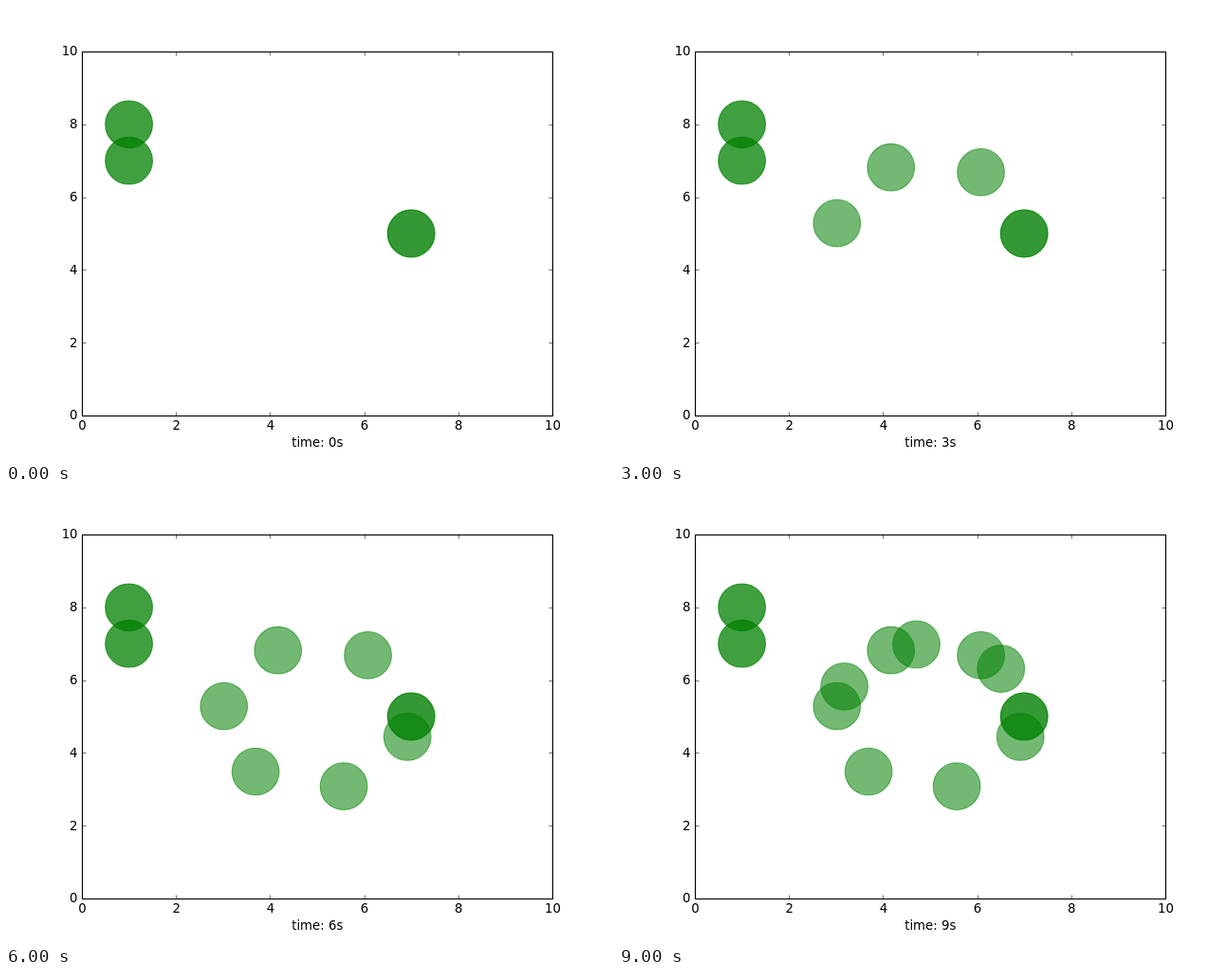
Recreate the animation shown at these times as an HTML page with a canvas. Size 640 by 480 pixels, loop 10 s.

```html
<!DOCTYPE html>
<html lang="en">
<head>
<meta charset="utf-8">
<title>Points on a circle</title>
<style>
  html, body { margin: 0; width: 100%; height: 100%; overflow: hidden; background: #fff; }
  canvas { display: block; }
</style>
</head>
<body>
<canvas id="stage" width="640" height="480"></canvas>
<script>
const ctx = document.getElementById('stage').getContext('2d');
const LEFT = 80, RIGHT = 576, TOP = 48, BOTTOM = 432;
const LINE = 10 / 9; // one point at 80 dpi
const toX = v => LEFT + v * (RIGHT - LEFT) / 10;
const toY = v => BOTTOM - v * (BOTTOM - TOP) / 10;
const snap = v => Math.round(v) + 0.5;

function dot(x, y, alpha) {
  ctx.globalAlpha = alpha;
  ctx.fillStyle = ctx.strokeStyle = '#008000';
  ctx.lineWidth = LINE;
  ctx.beginPath();
  ctx.arc(toX(x), toY(y), 24.845, 0, 2 * Math.PI);
  ctx.fill();
  ctx.stroke();
  ctx.globalAlpha = 1;
}

function segment(x, y, dx, dy) {
  ctx.beginPath();
  ctx.moveTo(x, y);
  ctx.lineTo(x + dx, y + dy);
  ctx.stroke();
}

function label(text, x, y, align) {
  ctx.textAlign = align;
  ctx.fillText(text, x, y);
}

function axes() {
  ctx.strokeStyle = ctx.fillStyle = '#000';
  ctx.font = '13.333px "DejaVu Sans", sans-serif';
  ctx.lineWidth = LINE / 2;
  for (let v = 0; v <= 10; v += 2) {
    const x = snap(toX(v)), y = snap(toY(v));
    segment(x, BOTTOM + 0.5, 0, -4);
    segment(x, TOP + 0.5, 0, 4);
    segment(LEFT + 0.5, y, 4, 0);
    segment(RIGHT + 0.5, y, -4, 0);
    label(v, toX(v) + 0.5, 447, 'center');
    label(v, 75.6, Math.round(toY(v) + 4.4), 'right');
  }
  ctx.lineWidth = LINE;
  ctx.strokeRect(LEFT + 0.5, TOP + 0.5, RIGHT - LEFT, BOTTOM - TOP);
}

function draw(second) {
  ctx.fillStyle = '#fff';
  ctx.fillRect(0, 0, 640, 480);
  dot(1, 8, 0.75);
  dot(1, 7, 0.75);
  dot(7, 5, 0.55); // the starting point is stacked twice
  for (let t = 0; t <= second; t++) {
    dot(5 + 2 * Math.cos(t), 5 + 2 * Math.sin(t), 0.55);
  }
  axes();
  label(`time: ${second}s`, 328.3, 465, 'center');
}

const start = performance.now();
function tick() {
  draw(Math.floor((performance.now() - start) / 1000) % 10);
  requestAnimationFrame(tick);
}
tick();
</script>
</body>
</html>
```
